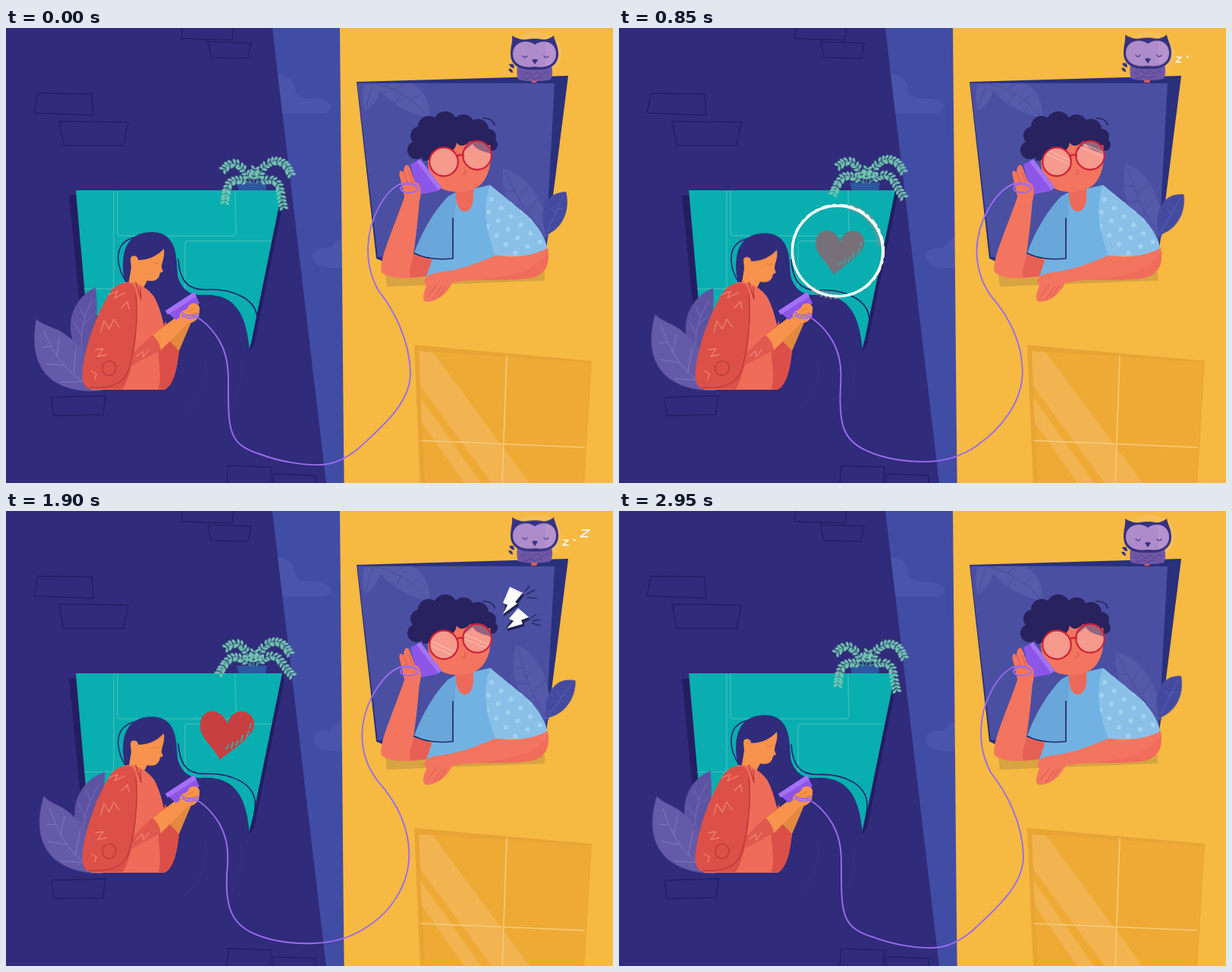
An HTML page without scripts that plays this animation: 800x600 px, repeating every 3000 ms.

```html
<!DOCTYPE html>
<html lang="en">
<head>
<meta charset="utf-8">
<title>String telephone</title>
<style>
html, body { margin: 0; height: 100%; overflow: hidden; background: #302b7a; }
svg { display: block; width: 100vw; height: 100vh; }
.line { fill: none; stroke-linecap: round; stroke-linejoin: round; }

.sway, .wave, .turn, .nod, .pop { animation: 3s linear infinite; }
.sway { animation-name: sway; animation-timing-function: ease-in-out; }
.wave { animation-name: wave; }
.nod { animation-name: nod; animation-timing-function: ease-in-out; }
@keyframes sway { 0%, 100% { transform: rotate(var(--a)); } 50% { transform: none; } }
@keyframes nod { 0%, 100% { transform: none; } 50% { transform: translateY(var(--y)); } }
@keyframes wave {
  0% { transform: none; }
  13% { transform: rotate(calc(var(--a) * .16)); }
  28% { transform: rotate(calc(var(--a) * .48)); }
  42% { transform: rotate(calc(var(--a) * .76)); }
  63% { transform: rotate(var(--a)); }
  77% { transform: rotate(calc(var(--a) * .91)); }
  100% { transform: rotate(calc(var(--a) * .15)); }
}
.turn { transform-origin: 127px 478px; animation-name: turn; }
@keyframes turn { 0% { transform: none; } 36%, 100% { transform: rotate(5.7deg); } }

.z1 { transform-origin: 734px 45px; animation-name: z1; }
.z2 { transform-origin: 749px 39px; animation-name: z2; }
.z3 { transform-origin: 757px 34px; animation-name: z3; }
@keyframes z1 { 0%, 9% { transform: scale(0); } 13%, 84% { transform: none; } 88%, 100% { transform: scale(0); } }
@keyframes z2 { 0%, 23% { transform: scale(0); } 27%, 82% { transform: none; } 86%, 100% { transform: scale(0); } }
@keyframes z3 { 0%, 46% { transform: scale(0); } 53%, 80% { transform: none; } 85%, 100% { transform: scale(0); } }

.b1 { transform-origin: 655px 136px; animation-name: b1; }
.b2 { transform-origin: 659px 156px; animation-name: b2; }
@keyframes b1 { 0%, 34% { transform: scale(0); } 40%, 80% { transform: none; } 87%, 100% { transform: scale(0); } }
@keyframes b2 { 0%, 37% { transform: scale(0); } 41.7% { transform: scale(.86); } 47%, 80% { transform: none; } 87%, 100% { transform: scale(0); } }

.heart { transform-origin: 291px 296px; animation-name: heart; }
@keyframes heart {
  0%, 20% { transform: scale(0); fill: #777078; }
  28.3% { transform: scale(.9); fill: #777078; }
  33% { transform: scale(1.05); }
  36%, 79% { transform: none; fill: #c83f41; }
  88%, 100% { transform: scale(0); fill: #c83f41; }
}
.ring { transform-origin: 288px 294px; animation-name: ring; }
@keyframes ring {
  0%, 20% { transform: scale(0); opacity: 1; }
  28.3% { transform: none; opacity: 1; }
  34% { transform: scale(1.14); opacity: .5; }
  36%, 100% { transform: scale(1.2); opacity: 0; }
}
.bits { transform-origin: 288px 294px; animation-name: bits; }
@keyframes bits {
  0%, 30% { transform: scale(.7); opacity: 0; }
  33% { opacity: 1; }
  41.7% { transform: none; opacity: .8; }
  48%, 100% { transform: scale(1.1); opacity: 0; }
}
.shine { animation-name: shine; }
@keyframes shine {
  0%, 20% { transform: translateY(-36px); }
  28.3% { transform: translateY(-13px); }
  45%, 78% { transform: none; }
  92%, 100% { transform: translateY(32px); }
}
</style>
</head>
<body>
<svg viewBox="0 0 800 600" preserveAspectRatio="none">
<defs>
  <marker id="leafs" markerUnits="userSpaceOnUse" markerWidth="16" markerHeight="16" refX="0" refY="0" viewBox="-8 -8 16 16" orient="auto">
    <g fill="#73c4ae">
      <path id="pair" d="M0 0C-1-3 1-6 4-6C5-3 3-1 0 0ZM0 0C-1 3 1 6 4 6C5 3 3 1 0 0Z"/>
      <use href="#pair" x="-5"/>
    </g>
  </marker>
  <clipPath id="lens"><circle cx="577" cy="176.500" r="18.500"/><circle cx="621" cy="168" r="18.500"/></clipPath>
  <clipPath id="right-lens"><circle cx="621" cy="168" r="18.500"/></clipPath>
  <clipPath id="sky"><path d="M351 0H441L446 600H422Z"/></clipPath>
  <clipPath id="sleeve"><path d="M638 207L688 248C704 264 712 280 714 293C692 303 665 301 645 300C634 270 626 240 638 207Z"/></clipPath>
</defs>

<!-- walls and sky -->
<path fill="#302b7a" d="M0 0H800V600H0Z"/>
<path fill="#414ca5" d="M351 0H445V600H422Z"/>
<g clip-path="url(#sky)" fill="#4955aa">
  <path d="M355 61C372 60 381 70 381 84C388 96 402 92 414 94C432 97 433 111 417 113H355Z"/>
  <path d="M446 276C434 278 432 288 425 290C408 288 400 298 407 308C414 317 430 317 446 317Z"/>
</g>
<path fill="#f6b942" d="M440 0H800V600H445.500Z"/>
<path class="line" stroke="#251f65" stroke-width="1.500" d="M233-2L231 14L298 16L300-2M266 18L323 20L319 40L270 39ZM42 86L113 87L115 115L37 112ZM70 123L161 124L155 155L76 155ZM60 487L131 485L128 510L63 511ZM291 602L293 577L350 579L348 602M352 602V588L408 590V602"/>
<path class="line" stroke="#3a3283" d="M252 392C270 430 268 480 236 506M296 400C317 430 315 480 291 513"/>

<!-- left window -->
<path fill="#241d62" d="M83 221L94 220L108 380L98 374ZM364 214L367 222L327 418L321 425Z"/>
<path fill="#09aeb0" d="M92 214H364L321 425L200 410L106 374Z"/>
<path class="line" stroke="#39bcb9" stroke-width="1.500" d="M147 215V270Q147 274 151 274H299Q303 274 303 270L302 215M142 215V340Q142 344 138 344H104M236 344V285Q236 281 240 281H349"/>

<!-- hanging plant -->
<path fill="#2d579f" d="M304 204H344L342 214H307Z"/>
<g class="line" stroke="#4c9f9b" stroke-width="1.300" style="marker-mid:url(#leafs);marker-end:url(#leafs)">
  <path class="sway" style="--a:-12deg;transform-origin:323px 204px" d="M323 204L320 192L315 182L308 175L299 175L292 179"/>
  <path class="sway" style="--a:-28deg;transform-origin:322px 204px" d="M322 204L314 196L306 192L298 192L291 197L286 203L281 210"/>
  <path class="sway" style="--a:8deg;transform-origin:330px 204px" d="M330 204L333 192L338 181L346 174L354 172L362 174L368 179L373 186"/>
  <path class="sway" style="--a:32deg;transform-origin:330px 204px" d="M330 204L338 195L347 190L356 191L363 197L370 205L377 212"/>
  <path class="sway" style="--a:4deg;transform-origin:326px 204px" d="M326 204L326 194L327 186"/>
</g>

<!-- left leaves -->
<g class="wave" style="--a:7.200deg;transform-origin:106px 440px">
  <path fill="#5d53a2" d="M118 342C95 353 81 377 86 405C89 420 98 428 108 436C118 414 123 380 118 342Z"/>
  <path class="line" stroke="#776db5" d="M114 358C102 380 98 400 100 424M99 404L89 388M101 392L115 378M104 382L97 368"/>
</g>
<g class="turn">
  <path fill="#655aa8" d="M127 478C62 484 27 450 40 384C50 394 64 393 78 404C104 422 122 446 127 478Z"/>
  <path class="line" stroke="#8579bb" d="M50 400C66 438 90 464 118 474M59 420L48 421M67 433L70 408M76 445L52 443M89 457L92 425M101 466L72 467"/>
</g>

<!-- woman -->
<path fill="#302b7a" d="M157 334C150 310 155 285 191 280C216 280 223 298 224 315C226 338 238 353 258 352C304 349 317 380 321 425L312 440L200 425Z"/>
<path class="line" stroke="#251f6c" stroke-width="1.600" d="M227 305C229 332 238 345 262 345C300 343 331 358 331 384C331 400 323 415 321 425">
  <animate attributeName="d" dur="3s" repeatCount="indefinite" values="M227 305C229 332 238 345 262 345C300 343 331 358 331 384C331 400 323 415 321 425;M227 308C229 335 238 348 262 347.500C298 346 327 362 327 388C327 402 322 415 321 425"/>
</path>
<g class="nod" style="--y:2.500px">
  <path class="line" stroke="#2b2570" stroke-width="1.600" d="M158 334C146 316 143 291 158 281C165 276 170 276 176 275"/>
  <path fill="#302b7a" d="M158 332C149 302 156 269 192 269C214 269 224 284 225 310L227 336H200Z"/>
  <path fill="#f7934c" d="M164 305C164 298 175 300 174 306C188 306 200 300 208 291C210 302 205 308 205 316L207 321L203 323C202 332 195 335 186 333L180 345L161 340L165 316Z"/>
  <path class="line" stroke="#d9763c" d="M194 309Q198 312 202 309"/>
</g>
<path fill="#ef6c58" d="M152 337C168 330 186 342 195 354C203 368 207 386 210 400L228 425C226 445 222 470 209 477H112C130 440 140 380 152 337Z"/>
<path fill="#db4f48" d="M168 429L196 402C206 396 209 392 210 386L228 425C226 448 221 472 209 477L201 476C206 455 200 440 201 426L160 448Z"/>
<path fill="#e0584e" d="M160 440C175 420 188 408 199 402L206 424C188 432 175 440 158 449Z"/>
<path fill="#dc5048" d="M155 337C165 333 172 340 173 358C173 405 169 450 154 476H113C103 476 99 466 101 449C106 408 130 354 142 343C146 339 150 337 155 337Z"/>
<path class="line" stroke="#f08370" stroke-width="1.300" d="M125 401L129 386L136 397L142 384L149 394M118 424L128 423L121 433L132 431M135 352L147 347L143 356L157 349M172 433L180 426L181 434L188 424M112 452L119 456L117 463M152 369L160 361L162 370"/>
<path class="line" stroke="#b83b3c" stroke-width="1.300" d="M145 448C145 461 127 462 127 449C127 436 145 436 145 448M111 474C135 476 156 470 162 450C171 415 174 380 171 352M171 335L178 358L177 342"/>
<path fill="#e3893f" d="M215 412L236 383L245 386L228 426Z"/>
<path fill="#f7934c" d="M193 405L231 376L243 386L204 425C203 416 199 410 193 405Z"/>
<path fill="#8f55e9" d="M210 373L248 348L255 363L224 385Z"/>
<path fill="#a470f5" d="M210 373L248 348L251 354L213 378Z"/>
<path fill="#f7934c" d="M229 379C231 370 239 374 241 366C246 360 257 363 255 372C255 382 250 389 240 389C233 389 229 386 229 379Z"/>
<path class="line" stroke="#d9763c" d="M240 374L248 370M241 379L252 375"/>

<!-- lower right window -->
<path fill="#e8a434" d="M538 418L772 439L762 600H546Z"/>
<path fill="#eeaa35" d="M544 426L771 441L761 600H552Z"/>
<path fill="#f1b450" d="M544 426L563 428L690 600H640L546 472ZM546 487L626 600H604L548 520Z"/>
<path class="line" stroke="#f4ca7a" stroke-width="1.600" d="M660 432L654 600M547 544L762 553"/>

<!-- right window -->
<path fill="#29307c" d="M462 71L741 63L712 292L497 308L488 304Z"/>
<path fill="#4a4fa2" d="M463 72.500L723 73L711 295L490 302Z"/>
<g fill="#555aab">
  <path d="M472 74H494C493 92 484 105 473 109C469 96 470 84 472 74ZM487 73H535C552 82 560 99 557 119C530 112 503 100 487 73Z"/>
  <path class="line" stroke="#474b9c" d="M487 73C515 80 540 95 557 119M512 81L523 74M521 86L513 100M534 95L547 87M483 75L475 103"/>
</g>
<g class="sway" style="--a:-12.500deg;transform-origin:715px 276px">
  <path fill="#5459aa" d="M676 175C665 208 671 250 715 276C722 245 714 192 676 175Z"/>
  <path class="line" stroke="#454a9c" d="M678 180C686 215 694 245 713 272M684 207L673 204M690 226L674 226M698 245L681 246M688 217L703 204M696 238L714 222"/>
</g>
<g class="wave" style="--a:13.500deg;transform-origin:712px 273px">
  <path fill="#444aa0" d="M738 216C712 216 700 242 712 273C735 264 744 238 738 216Z"/>
  <path class="line" stroke="#5a60b2" d="M734 222L714 268M727 239L734 238M725 243L717 237"/>
</g>

<!-- owl -->
<ellipse cx="699" cy="34" rx="34" ry="29" fill="#f4c268" opacity=".6"/>
<path fill="#f05a50" d="M691 67H701L699 72H693Z"/>
<g class="nod" style="--y:-2px">
  <path fill="#7057a6" d="M674 50H719C721 57 720 63 718 68C705 71 688 71 675 68C673 63 673 57 674 50Z"/>
  <path class="line" stroke="#5a4696" stroke-width="1.200" d="M679 60q3 4 6 0t6 0t6 0t6 0t6 0t6 0M682 66q3 3 6 0t6 0t6 0t6 0"/>
  <path fill="#353281" d="M667 10C673 14 680 16 686 15Q697 13 707 15C713 16 718 13 722 10C723 17 728 24 728 34C728 50 715 56 697 55C678 56 665 50 665 34C665 24 668 18 667 10Z"/>
  <path fill="#ae8bca" d="M697 22C707 14 725 18 725 34C725 49 711 53 697 51C683 53 668 49 668 34C668 18 687 14 697 22Z"/>
  <path fill="#c09ad4" opacity=".5" d="M711 18C729 20 729 46 711 51Z"/>
  <path class="line" stroke="#353281" stroke-width="1.200" d="M681 37q3 4 6 0M709 37q3 4 6 0"/>
  <path fill="#353281" d="M693 42Q697 40 701 42L697 48Z"/>
  <path fill="#353281" d="M663 48Q670 45 670 53Q665 53 663 48ZM662 54Q668 53 668 59Q664 59 662 54Z"/>
</g>
<g class="line" stroke="#fff" stroke-width="1.600">
  <path class="pop z1" d="M735 38.500H741L734 45H741"/>
  <path class="pop z2" d="M748.500 37L750 39"/>
  <path class="pop z3" d="M759 25H769L757 34H767"/>
</g>

<!-- man -->
<path fill="#d7a441" d="M500 326L710 322V333L502 341Z"/>
<path fill="#f3755f" d="M526 220L545 226C543 250 541 272 537 298L562 306L556 327C535 331 505 332 495 322C490 308 512 262 526 220Z"/>
<path fill="#e65f55" d="M537 299L562 306L556 327L533 329C530 317 536 307 537 299Z"/>
<path fill="#72b2e2" d="M583 222L594 216L616 212L638 207L665 298L582 326L554 328L562 304L538 297C550 264 568 237 583 222Z"/>
<path fill="#69a6da" d="M583 222L594 217C592 240 590 270 589 304C570 307 552 304 538 297C550 264 568 237 583 222Z"/>
<g clip-path="url(#sleeve)">
  <path fill="#8ac0e8" d="M620 200H720V310H620Z"/>
  <path class="line" stroke="#a2d2f0" stroke-width="6" stroke-dasharray="0 17" d="M640 226L715 292M636 243L710 308M655 218L725 280M634 262L680 305"/>
</g>
<path class="line" stroke="#252a68" stroke-width="1.700" d="M538 297C552 304 570 306 589 304V251"/>
<path fill="#f3755f" d="M714 290C718 312 711 326 690 330C655 334 615 330 588 336C581 352 566 362 553 361C547 358 551 348 554 340C548 331 554 326 566 323C598 320 620 310 645 300C668 303 692 302 714 290Z"/>
<path fill="#ee6758" opacity=".5" d="M714 296C716 316 708 327 690 330C655 334 640 332 620 332C660 328 698 322 714 296Z"/>
<path class="line" stroke="#d95550" d="M556 354L568 338M563 358L574 341M571 354L580 340"/>
<path fill="#ed695a" d="M592 202H616V224C615 249 593 248 593 221Z"/>
<g fill="#28225f">
  <circle cx="541" cy="161" r="12"/><circle cx="545" cy="142" r="12"/><circle cx="557" cy="130" r="14"/>
  <circle cx="579" cy="126" r="16"/><circle cx="603" cy="128" r="14"/><circle cx="622" cy="134" r="14"/>
  <circle cx="636" cy="143" r="10"/><circle cx="640" cy="154" r="8"/>
  <path d="M540 150L560 130H620L642 152L632 175H550Z"/>
</g>
<path class="line" stroke="#28225f" stroke-width="1.500" d="M629 119C638 119 643 123 644 128"/>
<path fill="#f3755f" d="M556 174C570 168 592 168 594 151C600 160 609 152 612 149C622 158 633 157 638 154C642 178 635 202 621 210C606 219 575 219 565 204C558 195 556 184 556 174Z"/>
<path class="line" stroke="#dc5650" stroke-width="1.200" d="M604 187Q608 192 602 193"/>
<g clip-path="url(#lens)">
  <path fill="#f59a8d" d="M555 145H645V200H555Z"/>
  <path fill="#96647f" clip-path="url(#right-lens)" d="M600 146H642V167C630 162 620 162 615 153L604 162Z"/>
  <path class="pop shine line" stroke="#ffc5b9" stroke-width="1.500" opacity=".6" d="M555 169L600 190M555 175L600 196M598 160L643 179M598 166L643 185"/>
</g>
<g class="line" stroke="#cf2038" stroke-width="2.200">
  <circle cx="577" cy="176.500" r="18.800"/><circle cx="621" cy="168" r="18.800"/>
  <path d="M594 169Q599 166 603 168"/>
</g>
<path fill="#8c56e9" d="M533 180L546 173L574 210L569 215L543 220Z"/>
<path fill="#a573f5" d="M546 173L574 210L570 214L541 176Z"/>
<path fill="#f3755f" d="M525 222L519 196C517 188 521 186 524 191C524 181 529 177 532 184L539 203C546 205 549 213 545 228Z"/>
<path class="line" stroke="#d95550" d="M525 192L530 206M531 190L536 203"/>

<!-- string -->
<g class="line" stroke="#9a6cee" stroke-width="1.900">
  <path d="M240 379C254 377 272 397 281 412C290 428 293 443 293 465C293 530 292 549 335 562C360 572 395 577 415 576C435 575 450 566 465 554C495 526 533 495 533 455C532 410 510 370 490 345C480 325 477 310 477 290C478 250 500 215 519 206">
    <animate attributeName="d" dur="3s" repeatCount="indefinite" calcMode="spline" keyTimes="0;.5;1" keySplines=".42 0 .58 1;.42 0 .58 1" values="M240 379C254 377 272 397 281 412C290 428 293 443 293 465C293 530 292 549 335 562C360 572 395 577 415 576C435 575 450 566 465 554C495 526 533 495 533 455C532 410 510 370 490 345C480 325 477 310 477 290C478 250 500 215 519 206;M240 379C254 377 272 397 281 412C290 428 293 443 292 465C286 515 296 540 320 554C345 567 375 570 405 569C430 568 455 562 475 549C510 530 532 490 531 450C530 410 510 380 490 358C475 340 468 320 468 296C469 255 495 215 519 206;M240 379C254 377 272 397 281 412C290 428 293 443 293 465C293 530 292 549 335 562C360 572 395 577 415 576C435 575 450 566 465 554C495 526 533 495 533 455C532 410 510 370 490 345C480 325 477 310 477 290C478 250 500 215 519 206"/>
  </path>
  <path d="M519 206C530 202 546 207 543 213C538 219 519 218 520 211C523 204 537 205 540 209M232 379Q243 386 254 380M231 375Q242 383 253 377"/>
</g>

<!-- heart message -->
<g class="pop ring line">
  <path stroke="#80908f" stroke-width="9" stroke-dasharray="4 2" stroke-linecap="butt" opacity=".75" d="M303 236C328 242 343 263 345 287M255 344Q272 354 290 353"/>
  <circle cx="288" cy="294" r="59.500" stroke="#fff" stroke-width="3.400"/>
  <circle cx="288.500" cy="293.500" r="60.500" stroke="#fff" stroke-width="2.400" stroke-dasharray="9 5 3 7"/>
</g>
<g class="pop heart">
  <path d="M292 281C288 268 276 261 266 265C254 270 253 288 261 299C268 309 277 318 282 328C296 316 320 302 326 287C331 270 315 260 303 266C297 269 293 275 292 281Z"/>
  <path class="line" stroke="#3aa9a6" stroke-width="2" d="M290 314L293 309M297 313L299 305M303 309L306 303M310 304L312 296M317 298L320 291M321 286L323 281"/>
</g>
<path class="pop bits line" stroke="#a5b7aa" stroke-width="2" d="M362 249L364 252M374 302L376 303M366 333L368 329M321 374L325 374M302 380L305 380"/>

<!-- sound bolts -->
<g class="pop b1">
  <path fill="#1d2154" d="M664 101L683 111L675 122L676 125L656 139L658 123Z"/>
  <path fill="#fff" d="M664 100L681 108L671 120L674 122L655 136L661 124L655 121Z"/>
  <path class="line" stroke="#252a63" stroke-width="1.500" d="M684 106L690 99M686 110L697 104M687 114L699 115"/>
</g>
<g class="pop b2">
  <path fill="#1d2154" d="M676 130L691 143L683 147L683 152L662 158L659 154Z"/>
  <path fill="#fff" d="M675 128L689 140L679 144L681 149L660 155L669 145L663 142Z"/>
  <path class="line" stroke="#252a63" stroke-width="1.500" d="M692 141L699 136M694 145L704 143M693 148L704 151"/>
</g>
</svg>
</body>
</html>
```
